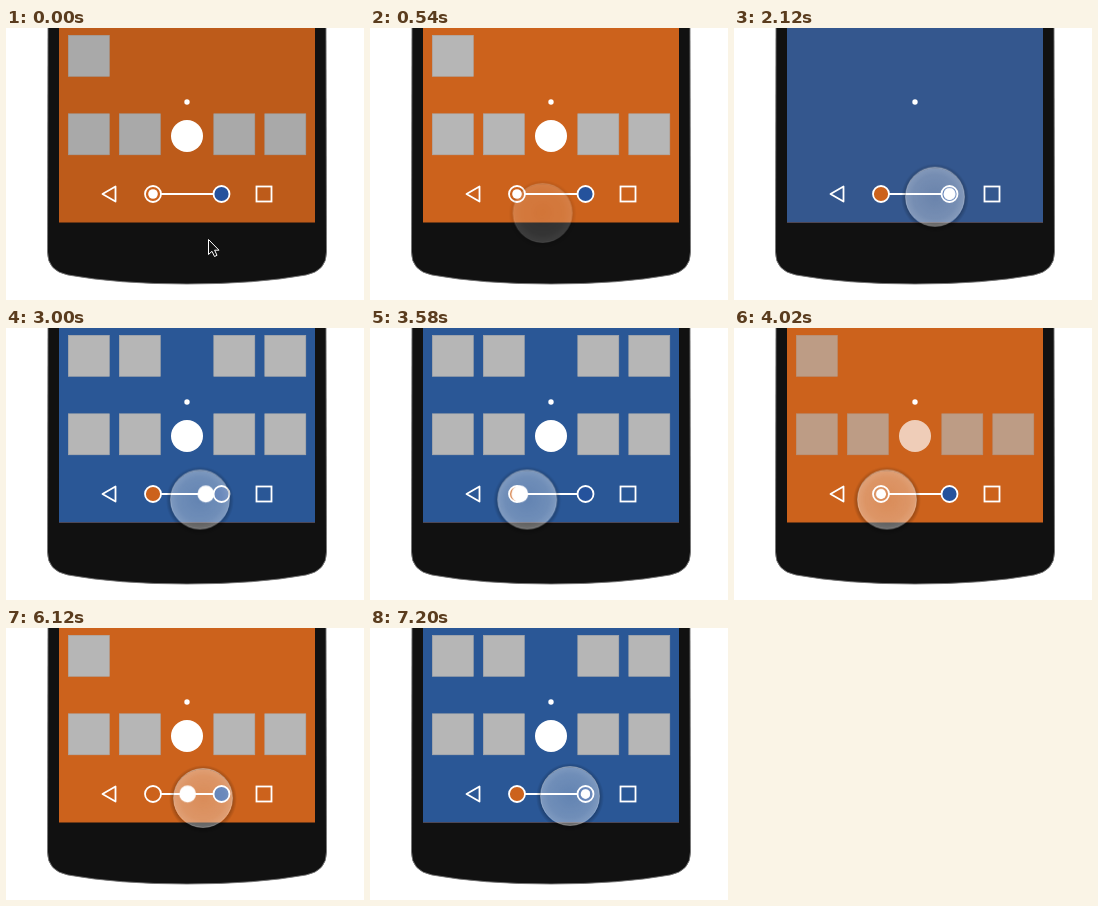
An HTML page for the animation above (7.22 s loop, 358 by 272 pixels).

```html
<!DOCTYPE html>
<html lang="en">
<head>
<meta charset="utf-8">
<title>Home screen switcher</title>
<style>
  html, body { margin: 0; width: 100%; height: 100%; overflow: hidden; background: #fff; }
  svg { display: block; width: 358px; height: 272px; }

  .blue, .icons, .extra, .tint, .knob, .grow, .finger, .touch, .cursor {
    animation: 7.22s linear infinite;
  }
  .blue { animation-name: blue; }
  .icons { animation-name: icons; }
  .extra { animation-name: extra; animation-timing-function: step-end; }
  .tint { animation-name: tint; }
  .knob { animation-name: knob; animation-timing-function: ease-in-out; }
  .grow { animation-name: grow; }
  .finger { animation-name: finger; }
  .touch { animation-name: touch; }
  .cursor { animation-name: cursor; animation-timing-function: step-end; }

  .line { fill: none; stroke: #fff; stroke-width: 1.8; }
  .tile { fill: #b6b6b6; stroke: #aaa; stroke-width: .6; }

  /* wallpaper crossfade after each drag */
  @keyframes blue {
    0%, 27.42% { opacity: 0; }
    29.5%, 51.8% { opacity: 1; }
    53.88%, 86.98% { opacity: 0; }
    89.06%, 100% { opacity: 1; }
  }
  @keyframes icons {
    0%, 25.48% { opacity: 1; }
    27.42%, 29.5% { opacity: 0; }
    32.13%, 49.86% { opacity: 1; }
    51.8%, 53.88% { opacity: 0; }
    56.51%, 85.04% { opacity: 1; }
    86.98%, 89.06% { opacity: 0; }
    91.69%, 100% { opacity: 1; }
  }
  @keyframes extra {
    0% { opacity: 0; }
    28.81% { opacity: 1; }
    53.19% { opacity: 0; }
    88.37%, 100% { opacity: 1; }
  }
  @keyframes tint {
    0% { opacity: .07; }
    4.16%, 100% { opacity: 0; }
  }
  @keyframes knob {
    0%, 19.11% { transform: translate(147px, 166px); }
    27.42%, 36.5% { transform: translate(215.5px, 166px); }
    51.8%, 82.55% { transform: translate(147px, 166px); }
    86.98%, 100% { transform: translate(215.5px, 166px); }
  }
  @keyframes grow {
    0%, 18.01% { transform: scale(1); }
    19.39%, 27.42% { transform: scale(1.75); }
    30.47%, 35.11% { transform: scale(1); }
    36.5%, 51.8% { transform: scale(1.75); }
    55.96%, 81.16% { transform: scale(1); }
    82.55%, 86.98% { transform: scale(1.75); }
    90.03%, 100% { transform: scale(1); }
  }
  @keyframes finger {
    0%, 5.54% { transform: translate(178px, 190px); }
    14.54%, 19.67% { transform: translate(153px, 166.5px); }
    27.7% { transform: translate(200px, 168px); }
    34.63% { transform: translate(204px, 171px); }
    41.55% { transform: translate(194px, 171.5px); }
    49.86% { transform: translate(156px, 171.5px); }
    55.68% { transform: translate(153px, 171.5px); }
    60.94% { transform: translate(153px, 168px); }
    73.96% { transform: translate(176px, 166.5px); }
    84.76% { transform: translate(197px, 170px); }
    90.03%, 100% { transform: translate(200px, 168px); }
  }
  @keyframes touch {
    0%, 5.54% { opacity: 0; }
    9.7%, 100% { opacity: 1; }
  }
  @keyframes cursor {
    0% { opacity: 1; }
    5.54%, 100% { opacity: 0; }
  }
</style>
</head>
<body>
<svg viewBox="0 0 358 272">
  <defs>
    <radialGradient id="glass">
      <stop offset="0" stop-color="#fff" stop-opacity=".27"/>
      <stop offset=".75" stop-color="#fff" stop-opacity=".33"/>
      <stop offset="1" stop-color="#fff" stop-opacity=".4"/>
    </radialGradient>
    <radialGradient id="shade">
      <stop offset=".86" stop-color="#000" stop-opacity="0"/>
      <stop offset=".87" stop-color="#000" stop-opacity=".24"/>
      <stop offset="1" stop-color="#000" stop-opacity="0"/>
    </radialGradient>
    <rect id="tile" class="tile" x=".3" y=".3" width="41" height="41"/>
  </defs>

  <path d="M42-2L41.500 224Q41.500 243 62 247Q112 256 181 256T300 247Q320.500 243 320.500 224L320-2Z"
        fill="#111" stroke="#777" stroke-width=".9"/>
  <rect x="53" width="256" height="194.500" fill="#cc621c"/>
  <rect class="blue" x="53" width="256" height="194.500" fill="#2a5796"/>

  <g class="icons">
    <use href="#tile" x="62" y="7"/>
    <g class="extra">
      <use href="#tile" x="113" y="7"/>
      <use href="#tile" x="207.500" y="7"/>
      <use href="#tile" x="258.500" y="7"/>
    </g>
    <use href="#tile" x="62" y="85.500"/>
    <use href="#tile" x="113" y="85.500"/>
    <use href="#tile" x="207.500" y="85.500"/>
    <use href="#tile" x="258.500" y="85.500"/>
  </g>
  <rect class="tint" x="53" width="256" height="194.500"/>
  <circle class="icons" cx="181" cy="108" r="16" fill="#fff"/>
  <circle cx="181" cy="74" r="2.700" fill="#fff"/>

  <g class="line">
    <path d="M96.500 166L109.500 158.500V173.500Z" stroke-linejoin="round"/>
    <rect x="250.500" y="158.500" width="15" height="15"/>
    <path d="M155 166H207"/>
    <circle cx="147" cy="166" r="8" fill="#cc621c"/>
    <circle cx="215.500" cy="166" r="8" fill="#25529c"/>
  </g>

  <g class="finger">
    <g class="touch">
      <circle r="34" cy="1" fill="url(#shade)"/>
      <circle r="29.500" fill="url(#glass)" stroke="#fff" stroke-opacity=".35" stroke-width=".8"/>
    </g>
  </g>
  <g class="knob"><circle class="grow" r="4.800" fill="#fff"/></g>

  <path class="cursor" d="M202.500 211.500V226.500L206 223.300L208.500 228.500L211 227.300L208.600 222.200H213Z"
        fill="#111" stroke="#fff" stroke-width="1"/>
</svg>
</body>
</html>
```
